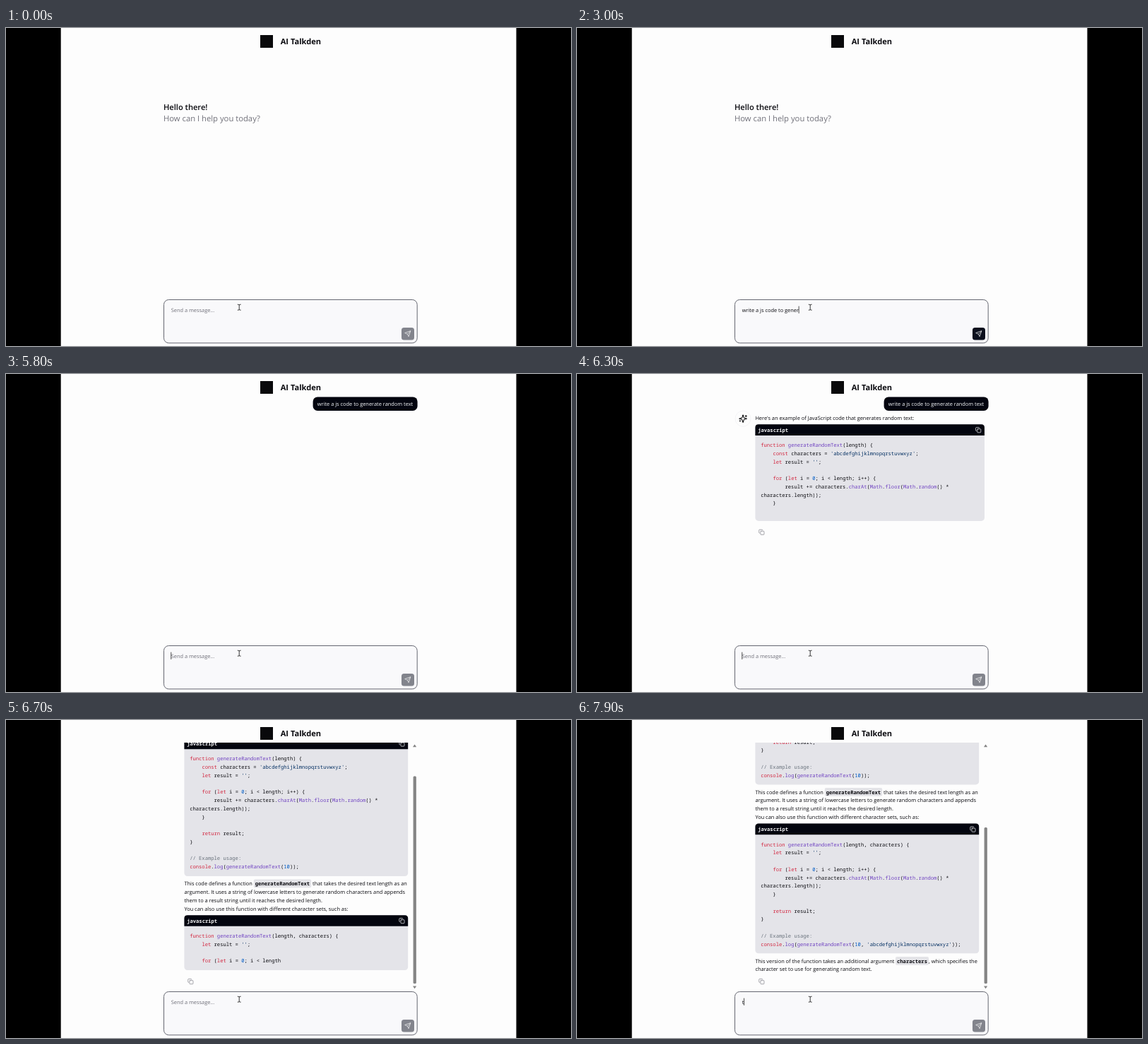
An HTML page for the animation above (8000 ms loop, 800x450 px).

```html
<!DOCTYPE html>
<html lang="en">
<head>
<meta charset="utf-8">
<title>Chat demo</title>
<style>
  html, body { margin: 0; width: 100%; height: 100%; overflow: hidden; background: #000; }
  svg { display: block; width: 800px; height: 450px; }
  text { font-family: "Open Sans", "Noto Sans", sans-serif; font-size: 7.41px; fill: #0b0b10;
         white-space: pre; text-rendering: geometricPrecision; }
  .mono { font-family: "Noto Sans Mono", "DejaVu Sans Mono", monospace; font-size: 7.16px; }
  .bold { font-weight: 600; }
  .icon { fill: none; stroke-linecap: round; stroke-linejoin: round; }
  .key { fill: #d2263f; } .fn { fill: #6f42c1; } .num { fill: #005cc5; }
  .str { fill: #032f62; } .note { fill: #6a737d; }
</style>
</head>
<body>
<svg viewBox="0 0 800 450">
  <defs>
    <clipPath id="view"><rect x="78" y="32" width="644" height="349"/></clipPath>
    <g id="copy" class="icon">
      <rect x="8" y="8" width="14" height="14" rx="2"/>
      <path d="M4 16c-1.1 0-2-.9-2-2V4c0-1.1.9-2 2-2h10c1.1 0 2 .9 2 2"/>
    </g>
  </defs>
  <rect width="800" height="450"/>
  <rect x="77.7" width="644.8" height="450" fill="#fdfdfd"/>

  <rect x="360" y="10" width="18" height="18" fill="#09090b"/>
  <text x="388.7" y="23.4" style="font-size:11.1px;font-weight:700">AI Talkden</text>

  <g id="welcome">
    <text x="223" y="116" class="bold" style="font-size:11.1px">Hello there!</text>
    <text x="223" y="132" style="font-size:11.25px;fill:#71717a">How can I help you today?</text>
  </g>

  <g clip-path="url(#view)"><g id="chat"></g></g>

  <g id="scrollbar" fill="#858585">
    <path d="M576 38.3h5.2l-2.6-3.8zM576 376.4h5.2l-2.6 3.8z"/>
    <rect id="thumb" x="576.6" width="4.3" rx="1.5"/>
  </g>

  <rect x="223.5" y="384.5" width="358.7" height="61.3" rx="7" fill="#f9f9fb" stroke="#656771"/>
  <text id="hint" x="233.7" y="401.8" style="fill:#71717a">Send a message...</text>
  <text id="input" x="233.7" y="401.8"></text>
  <rect id="caret" y="393.6" width="0.8" height="10.2" fill="#222"/>
  <rect id="send" x="560" y="424" width="18" height="17.6" rx="3.6" fill="#0c101d"/>
  <path class="icon" transform="translate(564.3 428.2) scale(.385)" stroke="#f4f4f5" stroke-width="1.9"
        d="m22 2-7 20-4-9-9-4ZM22 2 11 13"/>
  <path class="icon" stroke="#222" stroke-width=".9" d="M328.2 391.2q1.6 0 2 .7q.4-.7 2-.7M330.2 391.9v6.6M328.2 399.2q1.6 0 2-.7q.4.7 2 .7"/>
</svg>
<script>
const $ = id => document.getElementById(id);
const LOOP = 8000, STEP = 100, SENT = 5300, MONO = 4.297;
const VIEW_TOP = 32, VIEW_BOTTOM = 381;

const prompt = "write a js code to generate random text";
// Time of each key press, in steps
const keys = [1, 3, 4, 5, 6, 8, 10, 12, 14, 14, 15, 15, 17, 17, 18, 19, 20, 21, 22,
  24, 25, 26, 28, 30, 31, 31, 32, 34, 35, 37, 37, 39, 40, 41, 42, 43, 44, 45, 47];

const code = source => source.split("\n").map(text => ({ code: true, text }));
const prose = (text, chip) => ({ text, chip });
const loopBody = `    let result = '';

    for (let i = 0; i < length; i++) {
        result += characters.charAt(Math.floor(Math.random() *
characters.length));
    }

    return result;
}

// Example usage:
`;
const lines = [
  prose("Here's an example of JavaScript code that generates random text:"),
  ...code(`function generateRandomText(length) {
    const characters = 'abcdefghijklmnopqrstuvwxyz';
${loopBody}console.log(generateRandomText(10));`),
  prose("This code defines a function `generateRandomText` that takes the desired text length as an", 352.8),
  prose("argument. It uses a string of lowercase letters to generate random characters and appends"),
  prose("them to a result string until it reaches the desired length."),
  prose("You can also use this function with different character sets, such as:"),
  ...code(`function generateRandomText(length, characters) {
${loopBody}console.log(generateRandomText(10, 'abcdefghijklmnopqrstuvwxyz'));`),
  prose("This version of the function takes an additional argument `characters`, which specifies the", 453),
  prose("character set to use for generating random text.")
];

const charsBefore = n => lines.slice(0, n).reduce((sum, l) => sum + l.text.length + 1, 0);
const stream = [
  [6000, 0],
  [6300, charsBefore(9) + 1],
  [6700, charsBefore(22) + "    for (let i = 0; i < length".length],
  [6900, charsBefore(33) - " specifies the".length - 1],
  [7000, charsBefore(lines.length)]
];

function streamed(t) {
  if (t <= stream[0][0]) return 0;
  for (let i = 1; i < stream.length; i++) {
    const [t0, n0] = stream[i - 1], [t1, n1] = stream[i];
    if (t <= t1) return Math.round(n0 + (n1 - n0) * (t - t0) / (t1 - t0));
  }
  return stream[stream.length - 1][1];
}

const escape = s => s.replace(/&/g, "&amp;").replace(/</g, "&lt;");
const label = (x, y, body, cls = "", style = "") =>
  `<text x="${x}" y="${y}" class="${cls}" style="${style}">${body}</text>`;
const box = (x, y, w, h, r, fill) =>
  `<rect x="${x}" y="${y}" width="${w}" height="${h}" rx="${r}" fill="${fill}"/>`;
const copyIcon = (x, y, color) =>
  `<use href="#copy" transform="translate(${x - 4.3} ${y - 4.3}) scale(.36)" stroke="${color}" stroke-width="2"/>`;

const token = /(\/\/.*)|('[^']*'?)|\b(function|const|let|for|return|console)\b|\b(Math|\w+(?=\())|\b(\d+)\b/g;
const highlight = s => escape(s).replace(token, (m, note, str, key, fn) =>
  `<tspan class="${note ? "note" : str ? "str" : key ? "key" : fn ? "fn" : "num"}">${m}</tspan>`);

function proseLine({ chip }, text, y) {
  const [before, name, after = ""] = text.split("`");
  let out = label(252.4, y + 2.6, escape(before));
  if (name) {
    const w = name.length * MONO;
    out += box(chip - 2, y - 6, w + 4, 11.8, 2, "#e4e4e8") +
      label(chip, y + 2.6, name, "mono bold") + label(chip + w + 2, y + 2.6, escape(after));
  }
  return out;
}

function codeFrame(top, bottom, right) {
  const r = 4.5, x = 252.4, w = right - x;
  return box(x, top, w, bottom - top, r, "#e4e4e9") +
    `<path fill="#03050f" d="M${x} ${top + 15.7}v${r - 15.7}q0 ${-r} ${r} ${-r}h${w - 2 * r}q${r} 0 ${r} ${r}v${15.7 - r}z"/>` +
    label(256.2, top + 10.5, "javascript", "mono bold", "fill:#f4f4f5") +
    copyIcon(right - 8.8, top + 8, "#f4f4f5");
}

// Places the visible part of the reply and returns its rows, blocks and height
function layout(count) {
  const rows = [], blocks = [];
  let y = 62, left = count, prev = null;
  for (const line of lines) {
    if (left <= 0) break;
    if (prev) y += line.code ? (prev.code ? 11.75 : 38.7) : (prev.code ? 23.8 : 11.8);
    if (line.code) {
      if (!prev.code) blocks.push({ top: y - 29.5 });
      blocks[blocks.length - 1].bottom = y + 13.2;
    }
    rows.push({ line, y, text: line.text.slice(0, left) });
    left -= line.text.length + 1;
    prev = line;
  }
  const iconY = y + (prev.code ? 29.1 : 17.3);
  return { rows, blocks, iconY, scroll: Math.max(0, iconY + 11 - VIEW_BOTTOM) };
}

function drawChat(t) {
  const count = streamed(t);
  let out = "", scroll = 0;
  if (t >= SENT) {
    out += box(434.6, 32.4, 148, 19.6, 6.5, "#03050f") + label(440.8, 45.1, prompt, "", "fill:#f8fafc");
  }
  if (t >= SENT && count > 0) {
    const reply = layout(count);
    scroll = reply.scroll;
    const right = scroll ? 569.2 : 577;
    out += `<circle cx="235" cy="63.2" r="11" fill="none" stroke="#f0f0f2" stroke-width=".7"/>
      <path class="icon" transform="translate(228.8 57) scale(.52)" stroke="#09090b" stroke-width="2"
        d="M9.9 15.5A2 2 0 0 0 8.5 14.1L2.4 12.5a.5.5 0 0 1 0-1L8.5 9.9A2 2 0 0 0 9.9 8.5l1.6-6.1a.5.5 0 0 1 1 0L14.1 8.5A2 2 0 0 0 15.5 9.9l6.1 1.6a.5.5 0 0 1 0 1L15.5 14.1a2 2 0 0 0-1.4 1.4l-1.6 6.1a.5.5 0 0 1-1 0zM20 3v4M22 5h-4M4 17v2M5 18H3"/>`;
    for (const b of reply.blocks) out += codeFrame(b.top, b.bottom, right);
    for (const { line, y, text } of reply.rows) {
      out += line.code ? label(260.2, y + 2.5, highlight(text), "mono") : proseLine(line, text, y);
    }
    out += copyIcon(261.3, reply.iconY, "#85858d");
  }
  $("chat").innerHTML = out;
  $("chat").setAttribute("transform", `translate(0 ${-scroll})`);

  const view = VIEW_BOTTOM - VIEW_TOP, track = 332;
  $("scrollbar").style.display = scroll ? "" : "none";
  $("thumb").setAttribute("y", 41 + track * scroll / (view + scroll));
  $("thumb").setAttribute("height", track * view / (view + scroll));
}

function typed(t) {
  if (t >= 7900) return "t";
  return t >= SENT ? "" : prompt.slice(0, keys.filter(k => k * STEP <= t).length);
}

function caretOn(t) {
  if (t < SENT) return t >= 100 && t < 5000;
  return t >= 7900 || (t - 5790 + 1060) % 1060 < 530;
}

function drawInput(t) {
  const text = typed(t);
  $("input").textContent = text;
  $("hint").style.display = text ? "none" : "";
  $("caret").style.display = caretOn(t) ? "" : "none";
  $("caret").setAttribute("x", 233.4 + (text ? $("input").getComputedTextLength() : 0));
  $("send").setAttribute("opacity", t >= 300 && t < SENT ? 1 : 0.5);
}

let shown = -1;
function frame(now) {
  const t = Math.floor(now % LOOP / STEP) * STEP;
  if (t !== shown) {
    shown = t;
    $("welcome").style.display = t < SENT ? "" : "none";
    drawChat(t);
    drawInput(t);
  }
  requestAnimationFrame(() => frame(performance.now() - start));
}
const start = performance.now();
frame(0);
</script>
</body>
</html>
```
